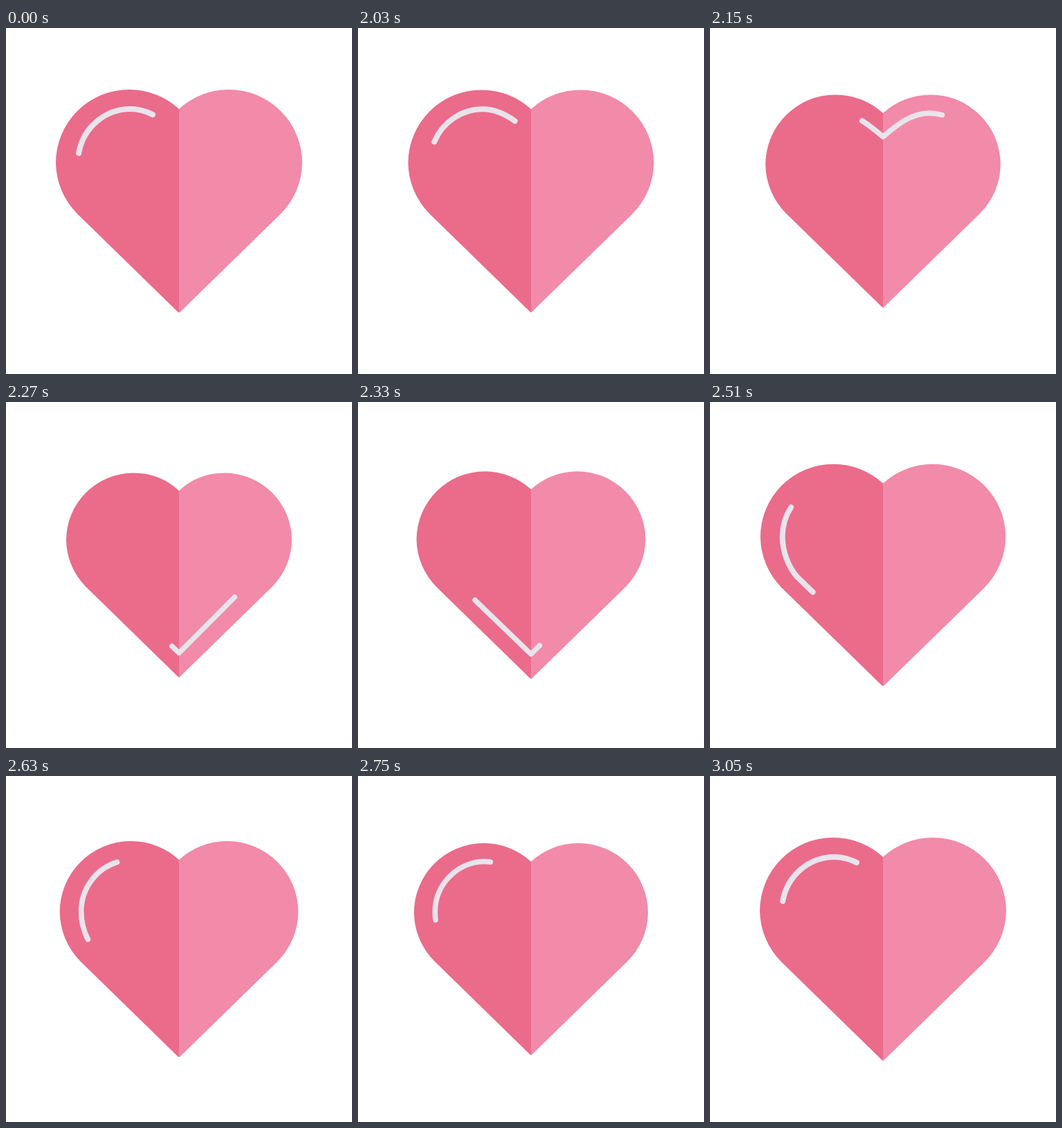
Write an HTML page that moves like this. It is 500 px wide and 500 px high and loops after 3290 ms.

```html
<!DOCTYPE html>
<html lang="en">
<head>
<meta charset="utf-8">
<title>Beating heart</title>
<style>
  html, body { margin: 0; width: 100%; height: 100%; overflow: hidden; background: #fff; }
  svg { display: block; width: 100vw; height: 100vh; }
</style>
</head>
<body>
<svg viewBox="0 0 500 500">
  <defs>
    <path id="half" d="M250 117A106 106 0 0 0 178 89A106 106 0 0 0 72 195A106 106 0 0 0 103 268.5L248.5 410.5Q249.2 411.3 250 411.3Z"/>
  </defs>
  <g id="heart">
    <use href="#half" fill="#eb6b8b"/>
    <use href="#half" fill="#f28aa9" transform="matrix(-1 0 0 1 500 0)"/>
    <path id="shine" pathLength="873" fill="none" stroke="#e9e4ec" stroke-width="8"
      stroke-linecap="round" stroke-linejoin="round" stroke-dasharray="140 733"
      d="M250 152.6C271 135 292 117 320 117A76 77 0 0 1 396 194C396 215 388.5 234.5 374 248.5L250 373L126 253.5C112 238 104 215 104 194A76 77 0 0 1 180 117C208 117 229 135 250 152.6Z"/>
  </g>
</svg>
<script>
const LOOP = 3290, START = 2030, STEP = 30;
const PERIMETER = 873, TAIL = 686;
const heart = document.getElementById('heart');
const shine = document.getElementById('shine');

// [step, scale] keys of the two beats
const beats = [[0, 1], [9.5, .915], [15.2, 1], [25, .95], [34, 1]];

const smooth = x => x * x * (3 - 2 * x);

// cubic-bezier(.42, 0, 0, 1), solved by bisection
function glide(x) {
  let lo = 0, hi = 1;
  for (let i = 0; i < 24; i++) {
    const s = (lo + hi) / 2;
    if (1.26 * s * (1 - s) ** 2 + s ** 3 < x) lo = s; else hi = s;
  }
  return smooth(hi);
}

function scaleAt(step) {
  const i = beats.findIndex(key => key[0] > step);
  if (i < 1) return 1;
  const [s0, v0] = beats[i - 1], [s1, v1] = beats[i];
  return v0 + (v1 - v0) * smooth((step - s0) / (s1 - s0));
}

function draw(now) {
  const t = now % LOOP;
  const step = t < START ? 0 : Math.floor((t - START) / STEP) + 1;
  const turn = step ? glide(Math.min(1, (step + 2.3) / 37)) : 0;
  const k = scaleAt(step);
  heart.setAttribute('transform', `translate(250 250) scale(${k}) translate(-250 -250)`);
  shine.setAttribute('stroke-dashoffset', -((TAIL + PERIMETER * turn) % PERIMETER));
}

const begin = performance.now();
function tick() {
  draw(performance.now() - begin);
  requestAnimationFrame(tick);
}
tick();
</script>
</body>
</html>
```
